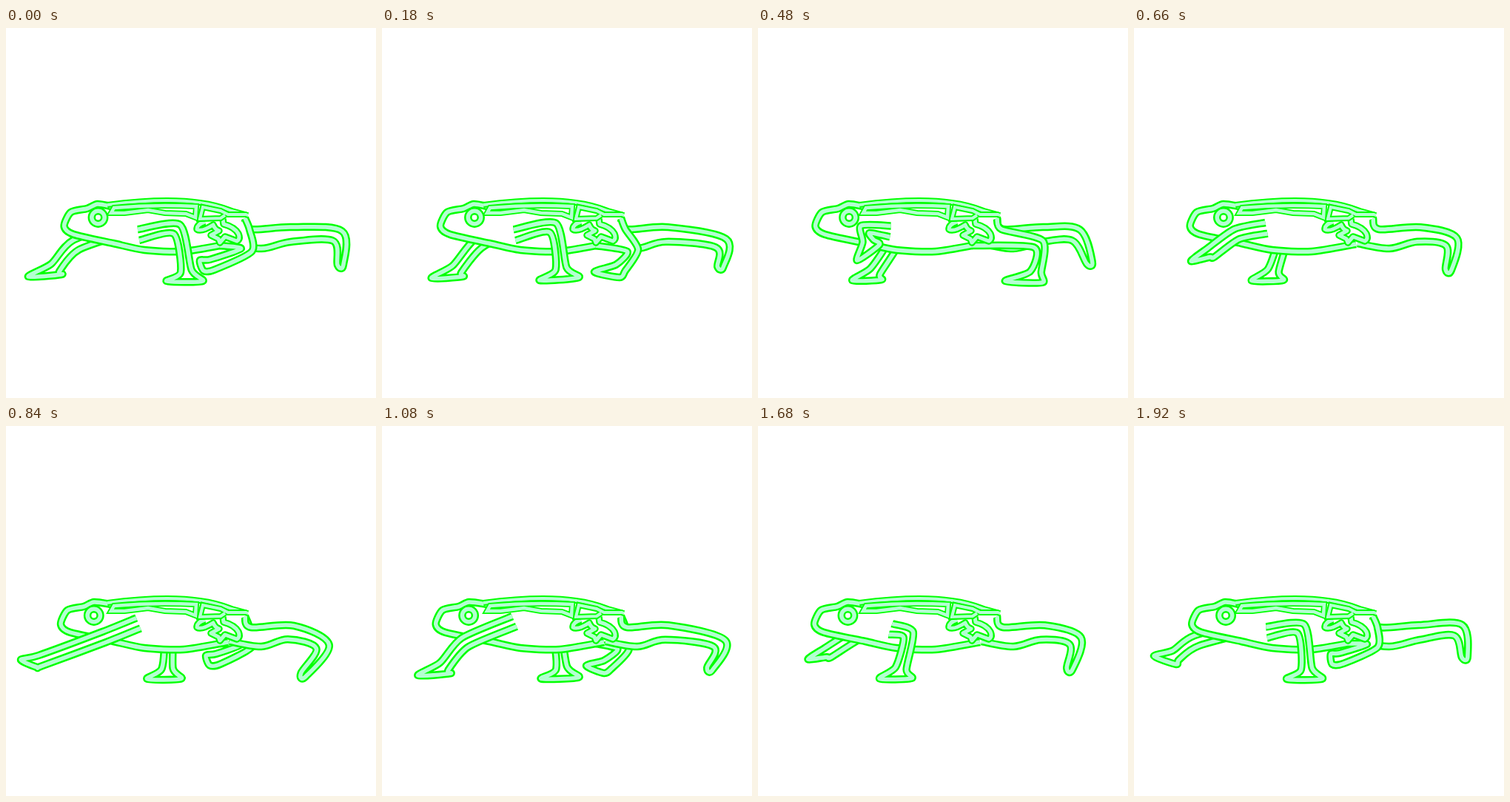
These frames come from a looping animation (500x500 px, 1980 ms). An HTML page with a canvas:

```html
<!DOCTYPE html>
<html lang="en">
<head>
<meta charset="utf-8">
<title>Walking lizard</title>
<style>
  html, body { margin: 0; width: 100%; height: 100%; overflow: hidden; background: #fff; }
  canvas { display: block; width: 500px; height: 500px; }
</style>
</head>
<body>
<canvas id="stage" width="500" height="500"></canvas>
<script>
const ctx = document.getElementById('stage').getContext('2d');
const LOOP = 1980, HALF = LOOP / 2, STEP = 60;
const EDGE = '#00ff00', CORE = '#b4ffd2';
const RUMP = [323, 257], GROIN = [289, 294];

// Strides: time, then joint, toe and heel. The far legs run half a loop apart.
const FRONT = [
  [0, 231, 272, 217, 342, 266, 342],
  [180, 231, 270, 213, 341, 266, 337],
  [360, 224, 264, 237, 343, 242, 312],
  [480, 145, 272, 134, 314, 164, 293],
  [840, 133, 285, 20, 316, 42, 326],
  [930, 85, 290, 27, 311, 57, 322],
  [990, 95, 293, 30, 336, 75, 333],
  [1440, 181, 290, 122, 341, 161, 340]
];
const REAR = [
  [0, 325, 300, 262, 314, 267, 328],
  [90, 326, 302, 276, 324, 300, 334],
  [360, 364, 298, 309, 341, 364, 343],
  [480, 379, 292, 334, 342, 384, 344],
  [1920, 322, 297, 266, 308, 268, 322]
];
// Two tail swings per loop: time, bend, tip.
const TAIL = [
  [0, 448, 281, 452, 320],
  [90, 456, 294, 443, 328],
  [360, 462, 284, 486, 312],
  [480, 430, 280, 448, 317],
  [840, 428, 298, 402, 336],
  [930, 438, 276, 447, 312]
];

const mix = (a, b, f) => a + (b - a) * f;
const between = (p, q, f) => [mix(p[0], q[0], f), mix(p[1], q[1], f)];
const wave = (t, peak) => Math.cos((t - peak) / LOOP * Math.PI * 2);

function unit(p, q) {
  const dx = q[0] - p[0], dy = q[1] - p[1], d = Math.hypot(dx, dy) || 1;
  return [dx / d, dy / d];
}

// Points of a repeating motion at time t.
function sample(keys, t, period) {
  t %= period;
  const next = keys.findIndex(k => k[0] > t);
  const b = next < 0 ? [period, ...keys[0].slice(1)] : keys[next];
  const a = next < 0 ? keys[keys.length - 1] : keys[next - 1];
  const f = (t - a[0]) / (b[0] - a[0]), pts = [];
  for (let i = 1; i < a.length; i += 2) pts.push([mix(a[i], b[i], f), mix(a[i + 1], b[i + 1], f)]);
  return pts;
}

// One side of a bone chain, set off by the given half width.
function side(bones, width) {
  return bones.map((p, i) => {
    const a = unit(bones[i - 1] || p, p), b = unit(p, bones[i + 1] || p);
    const [dx, dy] = unit([0, 0], [a[0] + b[0], a[1] + b[1]]);
    const w = Array.isArray(width) ? width[i] : width;
    return [p[0] - dy * w, p[1] + dx * w];
  });
}

function curve(pts, k = 1 / 8) {
  const path = new Path2D(), last = pts.length - 1;
  path.moveTo(...pts[0]);
  for (let i = 0; i < last; i++) {
    const p = pts[Math.max(i - 1, 0)], a = pts[i], b = pts[i + 1], n = pts[Math.min(i + 2, last)];
    path.bezierCurveTo(
      a[0] + (b[0] - p[0]) * k, a[1] + (b[1] - p[1]) * k,
      b[0] - (n[0] - a[0]) * k, b[1] - (n[1] - a[1]) * k, ...b);
  }
  return path;
}

function outline(path, wide = 10.5, thin = 5.5) {
  for (const [color, width] of [[EDGE, wide], [CORE, thin]]) {
    ctx.strokeStyle = color;
    ctx.lineWidth = width;
    ctx.stroke(path);
  }
}

function solid(path) {
  ctx.fill(path);
  outline(path);
}

function limb(root, [joint, toe, heel], ankleAt) {
  const base = between(toe, heel, ankleAt), [dx, dy] = unit(base, joint);
  const bones = [root, joint, [base[0] + dx * 14, base[1] + dy * 14]];
  return [...side(bones, 7.5), toe, heel, ...side(bones, -7.5).reverse()];
}

function frontLeg(t) {
  const shoulder = [179, 272 + 8 * wave(t, 100)];
  solid(curve(limb(shoulder, sample(FRONT, t, LOOP), 0.6)));
}

function rearLeg(t) {
  const pts = limb(between(RUMP, GROIN, 0.5), sample(REAR, t, LOOP), 0.8);
  solid(curve([GROIN, ...pts.slice(1, -1), [329, 272], RUMP]));
}

// Swinging legs pass out of sight behind the body.
const frontHidden = t => t > 380 && t < 600;
const rearHidden = t => t > 620 && t < 1770;

function tail(t) {
  const [bend, tip] = sample(TAIL, t, HALF);
  const bones = [[385, 279], bend, tip], widths = [10, 9, 4];
  const upper = side(bones, widths.map(w => -w)), lower = side(bones, widths).reverse();
  solid(curve([RUMP, [331, 272], ...upper, ...lower, [345, 298], [302, 291]], 1 / 6));
}

function body(t) {
  const nod = 4 * wave(t, 160) - 4;
  const head = [[124, 238], [110, 244], [88, 249], [79, 268], [92, 279]].map(([x, y]) => [x + nod * 0.8, y]);
  const trunk = curve([[142, 241], ...head, [145, 291], [187, 300], [240, 302], [300, 292]]);
  const inside = new Path2D(trunk);
  inside.lineTo(325, 255);
  inside.lineTo(262, 236);
  ctx.fill(inside);
  outline(trunk);
}

function eye(t) {
  const ring = new Path2D();
  ring.arc(121 + 4 * wave(t, 160), 256, 8.7, 0, Math.PI * 2);
  ctx.fill(ring);
  outline(ring, 10.5, 5.5);
}

const back = new Path2D('M137 239Q215 229 262 236Q285 239 305 247L327 253');
const stripe = new Path2D('M142 250L146 243Q200 238 257 241L256 256L243 251L215 250L192 246L160 250Z');
const hip = new Path2D('M325 252L300 252L290 247L266 242L262 258L290 257L296 253');
const marking = new Path2D('M269 262Q258 265 258 272Q264 276 280 266Q282 272 288 274L277 280' +
  'L287 285L289 290L296 282L312 288Q317 285 314 278Q309 269 294 265L293 258');

function draw(t) {
  const far = (t + HALF) % LOOP;
  ctx.fillStyle = '#fff';
  ctx.fillRect(0, 0, 500, 500);
  ctx.lineJoin = 'round';
  if (!rearHidden(far)) rearLeg(far);
  if (!frontHidden(far)) frontLeg(far);
  body(t);
  tail(t);
  if (!rearHidden(t)) rearLeg(t);

  outline(marking, 9.5, 5);
  outline(back, 8, 4);
  ctx.lineJoin = 'miter';
  outline(hip, 8, 4);
  outline(stripe, 8, 4.5);
  ctx.lineJoin = 'round';
  eye(t);
  frontLeg(t);
}

function tick() {
  draw(Math.floor(performance.now() % LOOP / STEP) * STEP);
  requestAnimationFrame(tick);
}
tick();
</script>
</body>
</html>
```
